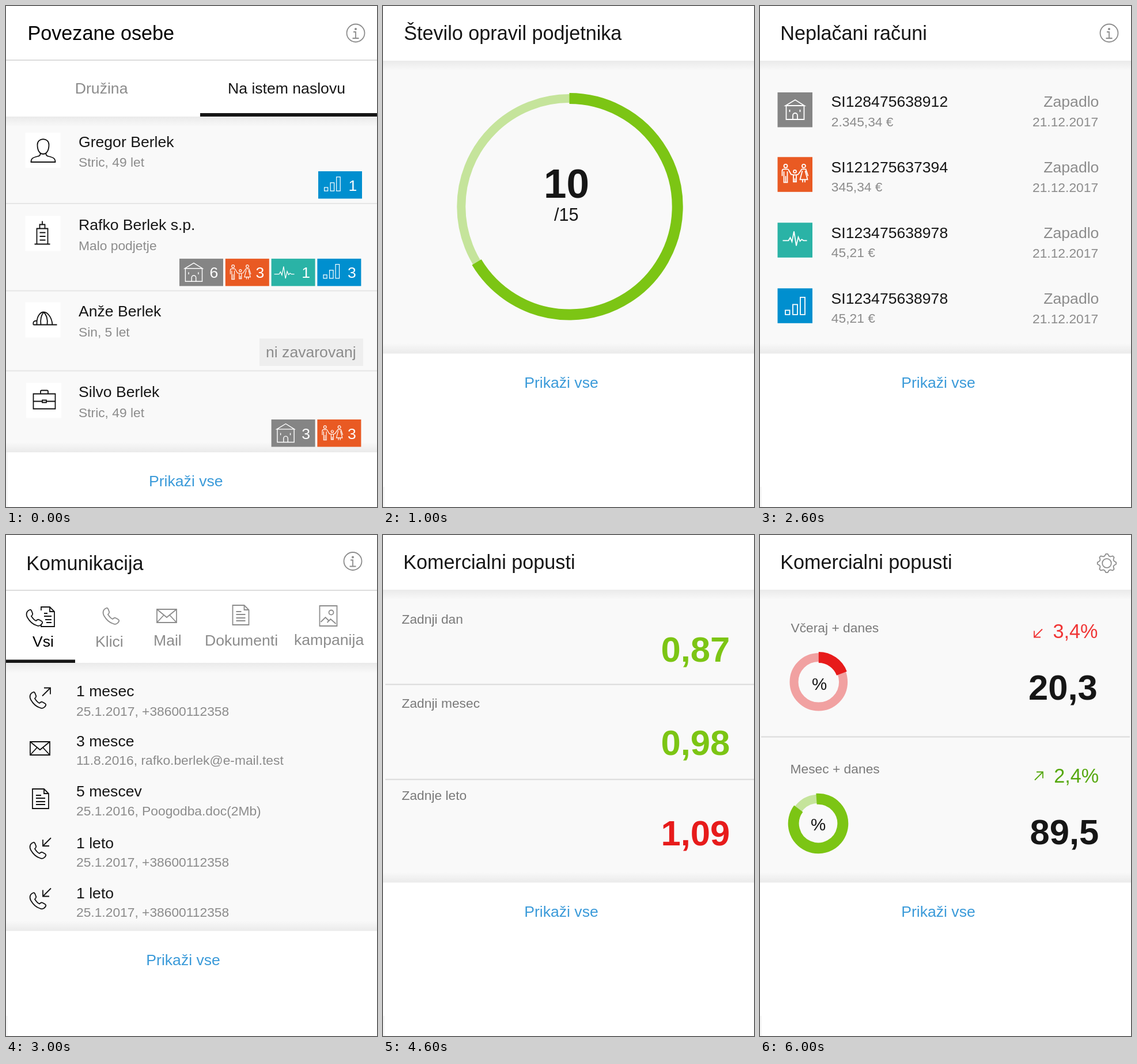
These frames come from a looping animation (644x870 px, 7000 ms). An HTML page:

```html
<!DOCTYPE html>
<html lang="sl">
<head>
<meta charset="utf-8">
<style>
  html, body { margin: 0; width: 100%; height: 100%; overflow: hidden; background: #fff; }
  svg { display: block; width: 644px; height: 870px; font-family: "Liberation Sans", Arial, sans-serif; }
  text { white-space: pre; transform: translateX(1px); }
</style>
</head>
<body>
<script>
const INK = '#161616', GREY = '#8c8c8c', LINK = '#3a9ad9', GREEN = '#7cc514', RED = '#e71b1b';
const SMALL = 22.8, BODY = 26.6, TITLE = 34.2;

const icons = {
  person: 'M21 21C21 8 41 8 41 21C41 31 37 37 31 37S21 31 21 21ZM26 35V37Q26 40 22 41C14 43 10 44 10 51H52C52 44 48 43 40 41Q36 40 36 37V35',
  building: 'M29.5 9V15M25 22V15H34V22M20 49V22H39V49M16 49H43M25 29H35M25 35.5H35M25 42H35',
  cap: 'M14 39C13 34 15 32 20 32V39M20 36C20 24 26 17 32 17S46 25 47 39M32 17C27 23 26 31 27 39M32 17C38 23 39 31 38 39M14 39H55',
  briefcase: 'M12.5 19H50.5V45H12.5ZM25 19V15Q25 13 27 13H36Q38 13 38 15V19M12.5 32H28M35 32H50.5M28 30H35V34H28Z',
  house: 'M14 23L30.5 13L46.5 23ZM15 23V47H46V23M26.5 47V40A4 4 0 0 1 34.5 40V47M21 30V34M39 30V34',
  family: 'M17 15.5A3 3 0 1 1 11 15.5A3 3 0 1 1 17 15.5M8 33V24Q8 21 11 21H17Q19 21 20 24L24 31M11 25V44H17V25M14 33V44' +
    'M32.5 25A2.5 2.5 0 1 1 27.5 25A2.5 2.5 0 1 1 32.5 25M24 30L27.5 31H32.5L36 30M27.5 31V43H32.5V31M30 37V43' +
    'M48.5 15.5A3 3 0 1 1 42.5 15.5A3 3 0 1 1 48.5 15.5M36 30L42 21H49L53 33M43 24L39 39H52L48 24M43.5 39V44M47.5 39V44',
  pulse: 'M9 31H19L22 26L25 33L28.5 15L32.5 40L36 25L39 32L42 29L45 31H51',
  bars: 'M13.5 38H21V45.5H13.5ZM26.5 28H34.5V45.5H26.5ZM39.5 15.5H47.5V45.5H39.5Z',
  phone: 'M6 1C1 3-1 8 2 14C6 21 11 26 18 28C22 30 26 28 28 24C29 22 28 21 22 18C20 17 19 18 17 20C14 19 11 15 9 12C11 10 12 9 11 7C9 1 8 0 6 1Z',
  mail: 'M0 0H34V23H0ZL17 14L34 0M0 23L12 10M34 23L22 10',
  doc: 'M1 1H21L29 9V35H1ZM21 1V9H29M7 12H16M7 17H23M7 23H23M7 28H23',
  docBehind: 'M7 7V1H22L30 9V35H7V31M22 1V9H30M12 12H18M12 17H25M14 23H25M16 28H25',
  image: 'M0 0H30V35H0ZM24 11.5A4 4 0 1 1 16 11.5A4 4 0 1 1 24 11.5M2 28L10 20L16 26M13 29L19 23L28 31',
  out: 'M0 14L14 0M3 0H14V11',
  in: 'M14 0L0 14M0 3V14H11',
  info: 'M15.5 0A15.5 15.5 0 1 1-15.5 0A15.5 15.5 0 1 1 15.5 0M-4-2H0V9M-5.5 9H5.5',
  gear: gearPath(),
};

// Tile colour, then badge centre x/y, icon centre y and badge scale
const kinds = {
  house: ['#858585', 24.5, 23.5, 30, .94],
  family: ['#e95a23', 26, 23.5, 28.5, .79],
  pulse: ['#2ab3a6', 22.5, 24, 27.5, .83],
  bars: ['#008fcf', 24, 22, 30.5, .81],
};

const rect = (x, y, w, h, fill) => `<rect x="${x}" y="${y}" width="${w}" height="${h}" fill="${fill}"/>`;
const text = (x, y, s, size = BODY, fill = INK, extra = '') =>
  `<text x="${x}" y="${y}" font-size="${size}" fill="${fill}" ${extra}>${s}</text>`;
const bold = (x, y, s, size = BODY, fill = INK) => text(x, y, s, size, fill, 'font-weight="700"');
const middle = (x, y, s, size, fill) => text(x, y, s, size, fill, 'text-anchor="middle"');
const small = (x, y, s, fill = GREY) => text(x, y, s, SMALL, fill);
const title = (s, x = 34.2, y = 59) => text(x, y, s, TITLE);
const link = (x, y) => text(x, y, 'Prikaži vse', BODY, LINK);
const stroke = (d, color, transform, width = 1.8) =>
  `<path d="${d}" fill="none" stroke="${color}" stroke-width="${width}" transform="${transform}"/>`;
const icon = (name, x, y, color = '#111') => stroke(icons[name], color, `translate(${x} ${y})`);
const rule = (y, color = '#e6e6e6', x = 0, end = 644) => rect(x, y - 1, end - x, 2, color);
const panel = (top, bottom) => rect(0, top, 644, bottom - top, '#f9f9f9') +
  rect(0, top, 644, 18, 'url(#down)') + rect(0, bottom - 18, 644, 18, 'url(#up)');
const info = (x, y) => icon('info', x, y, GREY) + `<circle cx="${x}" cy="${y - 7}" r="2" fill="${GREY}"/>`;

const boxed = (name, x, y) => rect(x, y, 61, 61, '#fff') + icon(name, x, y);
const tile = (name, x, y) => rect(x, y, 60.5, 60.5, kinds[name][0]) + icon(name, x, y, '#fff');
function badge(name, x, y, count) {
  const [color, cx, cy, iconY, scale] = kinds[name];
  return rect(x, y, 76, 47.5, color) +
    stroke(icons[name], '#fff', `translate(${x + cx} ${y + cy}) scale(${scale}) translate(-30 ${-iconY})`, 1.5) +
    middle(x + 59, y + 33.5, count, BODY, '#fff');
}
const badges = (x, y, list) => list.map(([name, count], i) => badge(name, x + i * 79.8, y, count)).join('');
const person = (kind, x, y, textX, name, note) =>
  boxed(kind, x, y) + text(textX, y + 24.7, name) + small(textX, y + 59, note);

function arc(cx, cy, r, from, to, color, width) {
  const at = deg => {
    const a = deg * Math.PI / 180;
    return `${cx + r * Math.sin(a)} ${cy - r * Math.cos(a)}`;
  };
  return stroke(`M${at(from)}A${r} ${r} 0 ${+(to - from > 180)} 1 ${at(to)}`, color, '', width);
}
const ring = (cx, cy, r, from, to, color, pale) =>
  `<circle cx="${cx}" cy="${cy}" r="${r}" fill="none" stroke="${pale}" stroke-width="15"/>` +
  arc(cx, cy, r, from, to, color, 19);

function gearPath() {
  const points = Array.from({ length: 32 }, (_, i) => {
    const a = (i - 1.5) * Math.PI / 16, r = i % 4 === 1 || i % 4 === 2 ? 16.3 : 13;
    return `${r * Math.sin(a)} ${-r * Math.cos(a)}`;
  });
  return `M${points.join('L')}ZM7.8 0A7.8 7.8 0 1 1-7.8 0A7.8 7.8 0 1 1 7.8 0`;
}

function related() {
  return text(36.4, 59, 'Povezane osebe', TITLE, '#000') + info(607, 47) + rule(94, '#dcdcdc') +
    text(118.8, 152, 'Družina', BODY, GREY) + text(384, 152, 'Na istem naslovu') +
    panel(192, 775) + rect(337, 186, 307, 6, INK) + rect(0, 775, 3, 60, '#f7f7f7') +
    [343, 494.5, 633.5].map(y => rule(y)).join('') +
    person('person', 33.5, 220, 125, 'Gregor Berlek', 'Stric, 49 let') +
    person('building', 33.5, 364.5, 125, 'Rafko Berlek s.p.', 'Malo podjetje') +
    person('cap', 33.5, 514.5, 125, 'Anže Berlek', 'Sin, 5 let') +
    person('briefcase', 35, 654.5, 125, 'Silvo Berlek', 'Stric, 49 let') +
    badge('bars', 542, 287, 1) +
    badges(301, 438.8, [['house', 6], ['family', 3], ['pulse', 1], ['bars', 3]]) +
    rect(440, 577.5, 180, 47.5, '#eee') + text(450, 610, 'ni zavarovanj', BODY, GREY) +
    badges(460.6, 718, [['house', 3], ['family', 3]]) + link(247, 834);
}

function tasks() {
  return title('Število opravil podjetnika', 35.2) + panel(95, 603.5) +
    ring(323.5, 348.3, 187.7, 0, 239, GREEN, '#c5e49b') +
    bold(278, 332.5, '10', 71) + text(296, 373, '/15', 30.6) + link(244.2, 663);
}

function bills() {
  const rows = [
    ['house', 150, 'SI128475638912', '2.345,34 €'],
    ['family', 262.3, 'SI121275637394', '345,34 €'],
    ['pulse', 376.3, 'SI123475638978', '45,21 €'],
    ['bars', 490.3, 'SI123475638978', '45,21 €'],
  ];
  return title('Neplačani računi') + info(606, 47) + panel(95, 603.5) + link(244.2, 663) +
    rows.map(([kind, y, number, amount], i) => {
      const base = 175 + i * 114;
      return tile(kind, 30.5, y) + text(122.6, base, number) + small(122.8, y + 59.3, amount) +
        text(491.3, base, 'Zapadlo', BODY, GREY) + small(472, base + 34.2, '21.12.2017');
    }).join('');
}

function messages() {
  const call = '25.1.2017, +38600112358';
  const rows = [
    [280, 313.7, '1 mesec', call],
    [367, 399.3, '3 mesce', '11.8.2016, rafko.berlek@e-mail.test'],
    [454, 486.7, '5 mescev', '25.1.2016, Poogodba.doc(2Mb)'],
    [543.5, 575.7, '1 leto', call],
    [631, 663.3, '1 leto', call],
  ];
  return title('Komunikacija', 34.2, 61) + info(602, 45.5) + rule(96, '#dcdcdc') + panel(222, 687.5) +
    rect(0, 216.5, 120, 5.5, INK) +
    icon('phone', 35, 129) + icon('docBehind', 54, 124) + text(45, 193.5, 'Vsi', BODY, '#000') +
    icon('phone', 168, 126, GREY) + text(154, 193.5, 'Klici', BODY, GREY) +
    icon('mail', 262, 129, GREY) + text(255, 192, 'Mail', BODY, GREY) +
    icon('doc', 392.5, 121, GREY) + text(344, 192, 'Dokumenti', BODY, GREY) +
    icon('image', 544.5, 123, GREY) + text(499, 190.5, 'kampanija', BODY, GREY) +
    rows.map(([y, noteY, age, note]) => text(121, y, age) + small(121, noteY, note)).join('') +
    icon('phone', 41, 272) + icon('out', 63, 265.5) + icon('mail', 42, 359) + icon('doc', 45, 440) +
    [533, 620.5].map(y => icon('phone', 41, y) + icon('in', 64, y - 7)).join('') + link(242.3, 746.5);
}

function discounts() {
  const rows = [
    [154, 219.5, 'Zadnji dan', '0,87', GREEN],
    [300.3, 382.3, 'Zadnji mesec', '0,98', GREEN],
    [460, 538.5, 'Zadnje leto', '1,09', RED],
  ];
  return title('Komercialni popusti') + panel(95, 603.5) + link(244.2, 663) +
    rule(259.5, '#dadada', 4) + rule(424.5, '#dadada', 4) +
    rows.map(([y, valueY, label, value, color]) =>
      small(31.5, y, label, '#7a7a7a') + bold(481.5, valueY, value, 61.5, color)).join('');
}

function bundle() {
  const policies = (x, y, percent, count, gap) => bold(x, y, percent, BODY, '#000') +
    text(x + gap, y - 1.3, 'popust', BODY, GREY) + bold(x + gap + 117, y, count, BODY, '#000') +
    text(x + gap + 147, y, 'Št. polic', BODY, GREY);
  return title('Zelfrin komplet', 31.5, 61) + small(38.2, 99, '02543856') + info(607, 42) + rule(128, '#dcdcdc') +
    bold(38.5, 198, '1.356,93€', TITLE, '#000') + small(42.2, 233.7, 'skupni znesek') +
    policies(298, 192, '20%', 5, 70.2) +
    badges(295, 220.5, [['house', 2], ['family', 1], ['pulse', 1], ['bars', 1]]) +
    panel(300, 741) + rule(451, '#e6e6e6', 0, 580) + rule(592, '#e6e6e6', 0, 580) +
    person('person', 31.5, 326.7, 123, 'Magdalena Žabrunec Berlek', 'Žena, 37 let') +
    person('briefcase', 31.5, 471, 123, 'Anže Berlek', 'Sin, 25 let') +
    person('building', 31.5, 615.5, 123, 'Silvo Berlek s.p.', 'malo podjetje') +
    [421.7, 562.3, 708.3].map(y => policies(281, y, '5%', 1, 54.5)).join('') + link(245.3, 800);
}

function trends() {
  return title('Komercialni popusti') + icon('gear', 602, 49, GREY) + panel(95, 603.5) + link(244.2, 663) +
    rule(350.5, '#dadada', 2, 642) +
    small(52.5, 169, 'Včeraj + danes', '#7a7a7a') + small(51.5, 414, 'Mesec + danes', '#7a7a7a') +
    ring(101.8, 255.3, 42.8, 0, 69.5, RED, '#f1a1a1') + middle(102, 268.5, '%', 29.5) +
    ring(101, 501, 42.8, -4, 307, GREEN, '#c5e49b') + middle(100, 513, '%', 29.5) +
    icon('in', 476, 163.5, '#f03535') + text(507.5, 179, '3,4%', TITLE, '#f03535') +
    icon('out', 477, 411.5, '#56a80f') + text(509.2, 430, '2,4%', TITLE, '#56a80f') +
    bold(465, 285.7, '20,3', 61.5) + bold(467.5, 536.7, '89,5', 61.5);
}

const fade = (id, from, to) => `<linearGradient id="${id}" x2="0" y2="1">
  <stop offset="0" stop-opacity="${from}"/><stop offset="1" stop-opacity="${to}"/></linearGradient>`;
const scenes = [related, tasks, bills, messages, discounts, bundle, trends];
document.body.innerHTML = `<svg viewBox="0 0 644 870"><defs>${fade('down', .06, 0)}${fade('up', 0, .06)}</defs>
  <path d="M0 835H3V866Q3 869 6 870H0Z" fill="#f7f7f7"/>
  ${scenes.map(draw => `<g class="scene" display="none">${draw()}</g>`).join('')}</svg>`;

const layers = document.querySelectorAll('.scene');
const start = performance.now();
function tick() {
  const current = Math.floor(Math.max(0, performance.now() - start) / 1000) % layers.length;
  layers.forEach((layer, i) => layer.setAttribute('display', i === current ? 'inline' : 'none'));
  requestAnimationFrame(tick);
}
tick();
</script>
</body>
</html>
```
